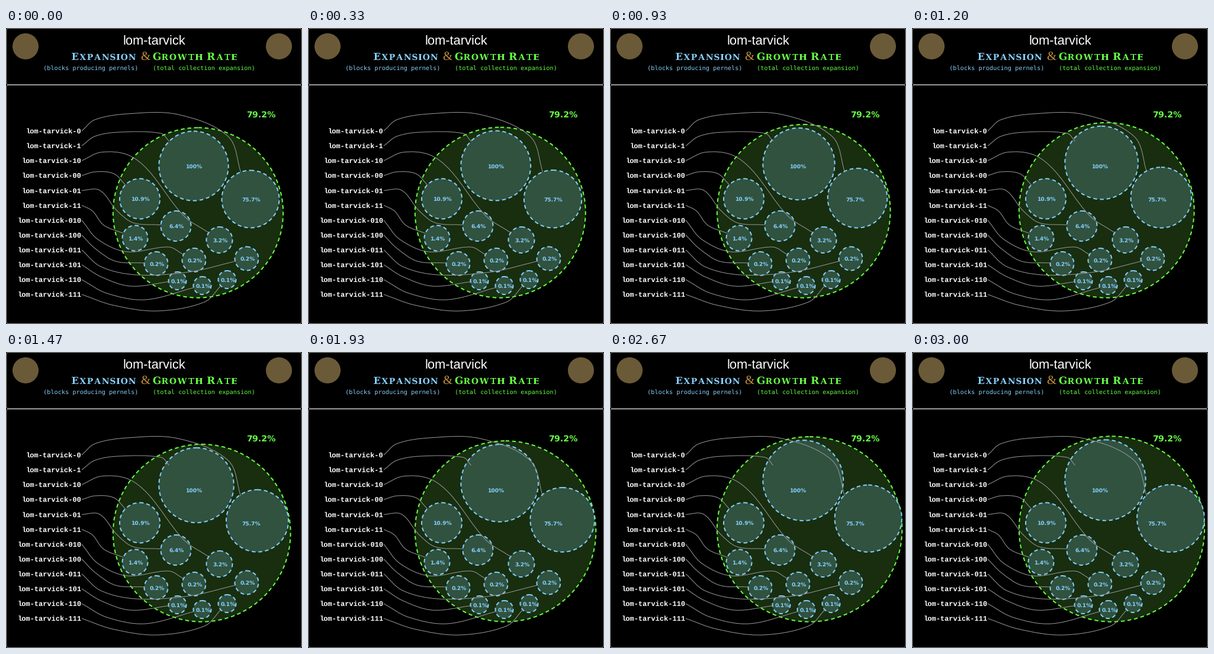
Recreate the animation shown at these times as a matplotlib script. Size 500 by 500 pixels, loop 4730 ms.

```python
import math

import matplotlib.pyplot as plt
import numpy as np
from matplotlib.animation import FuncAnimation
from matplotlib.patches import Circle, FancyBboxPatch, PathPatch
from matplotlib.path import Path
from matplotlib.textpath import TextPath
from matplotlib.transforms import Affine2D

SIZE, DPI = 500, 100
PX = 72 / DPI                      # points per pixel
FRAMES, INTERVAL = 110, 43
GROW_MS = 3000

BLUE, GREEN, GOLD, GRAY = "#87cefa", "#66ff44", "#bd8f3c", "#999999"
OUTER_FILL, INNER_FILL, COIN = "#182e0f", "#30523f", "#6b5a38"
NAME = "lom-tarvick"

plt.rcParams["text.hinting"] = "none"
fig = plt.figure(figsize=(SIZE / DPI, SIZE / DPI), dpi=DPI, facecolor="black")
ax = fig.add_axes([0, 0, 1, 1])
ax.set(xlim=(0, SIZE), ylim=(SIZE, 0))
ax.axis("off")


def label(x, y, s, px, color, font, ha="center", weight="normal"):
    ax.text(x, y, s, fontsize=px * PX, color=color, family=font, ha=ha,
            va="baseline", weight=weight, zorder=5)


def panel(top, bottom):
    ax.add_patch(FancyBboxPatch((0.5, top), SIZE - 1, bottom - top, fc="black",
                                ec=GRAY, lw=PX,
                                boxstyle="round,pad=0,rounding_size=3.5"))


def dashed(x, y, r, fill, edge, z):
    return ax.add_patch(Circle((x, y), r, fc=fill, ec=edge, lw=2 * PX,
                               ls=(0, (3.2, 2.4)), zorder=z))


def unit(v):
    return v / np.hypot(*v)


def leader(points):
    """Smooth line through the points."""
    p = np.array(points, float)
    ends = np.vstack([p[:1], p, p[-1:]])
    aim = [unit(b - a) for a, b in zip(ends, ends[2:])]
    verts = [p[0]]
    for i in range(len(p) - 1):
        reach = np.hypot(*(p[i + 1] - p[i])) / 3
        verts += [p[i] + reach * aim[i], p[i + 1] - reach * aim[i + 1], p[i + 1]]
    codes = [Path.MOVETO] + [Path.CURVE4] * (len(verts) - 1)
    ax.add_patch(PathPatch(Path(verts, codes), fc="none", ec=GRAY, lw=PX, zorder=4))


def small_caps(cx, y, text, big, small, gap, color):
    """Words with a large first letter, letter-spaced and centred on cx."""
    glyphs, x, first = [], 0, True
    for ch in text.upper():
        if ch == " ":
            x += 0.4 * small
            first = True
            continue
        path = TextPath((0, 0), ch, size=big if first else small,
                        prop={"family": "DejaVu Serif", "weight": "bold"})
        box = path.get_extents()
        glyphs.append((path, x - box.x0))
        x += box.width + gap
        first = False
    left = cx - (x - gap) / 2
    for path, dx in glyphs:
        move = Affine2D().scale(1, -1).translate(left + dx, y)
        ax.add_patch(PathPatch(move.transform_path(path), fc=color, lw=0, zorder=5))


# Header
panel(0.5, 95.5)
panel(96.5, 499.5)
for x in (33, 461):
    ax.add_patch(Circle((x, 31), 22, fc=COIN, lw=0))
label(250, 29, NAME, 21.9, "white", "Liberation Sans")
small_caps(165, 54, "Expansion", 17, 14, 2.2, BLUE)
label(235, 55, "&", 21, GOLD, "Liberation Serif")
small_caps(319.5, 54, "Growth Rate", 17, 14, 2.2, GREEN)
label(63, 71, "(blocks producing pernels)", 10.2, BLUE, "DejaVu Sans Mono", "left")
label(248, 71, "(total collection expansion)", 10.2, GREEN, "DejaVu Sans Mono", "left")
label(430.5, 150.5, "79.2%", 14.2, GREEN, "DejaVu Sans", weight="bold")

# Suffix, share, bubble (x, y, r), points the leader passes on its way
items = [
    ("0", 75.7, (413, 289, 48.5), [(150, 155), (205, 145), (290, 146), (375, 183)]),
    ("1", 100, (317, 233, 58.7), [(150, 183), (190, 176), (262, 178)]),
    ("10", 3.2, (360.5, 358, 22), [(160, 210), (205, 214), (240, 240), (300, 317)]),
    ("00", 10.9, (226, 288.5, 34), [(150, 243), (182, 246)]),
    ("01", 6.4, (287, 334.5, 25.5), [(158, 274), (187, 308), (215, 329)]),
    ("11", 1.4, (218, 355, 21.5), [(146, 309), (165, 333)]),
    ("010", 0.2, (317.5, 392, 20), [(155, 357), (204, 378), (275, 370)]),
    ("100", 0.2, (253.5, 398, 20), [(150, 372), (185, 394)]),
    ("011", 0.2, (406.5, 389.5, 20), [(160, 403), (220, 417), (310, 412)]),
    ("101", 0.1, (289.5, 427, 15), [(160, 420), (210, 436)]),
    ("110", 0.1, (331.5, 435, 15), [(170, 448), (235, 459)]),
    ("111", 0.1, (373.5, 425, 15), [(180, 468), (255, 478), (335, 463)]),
]
# How far x, y and r move while growing
growth = {"0": (24, -8, 8.4), "1": (9.5, -16.5, 9.5)}

outer = (324.5, 312, 143.7)
growing = [(dashed(*outer, OUTER_FILL, GREEN, 2), outer, (13, -13, 13))]

for i, (suffix, share, bubble, via) in enumerate(items):
    x, y, r = bubble
    row = 174 + 25.1 * i
    patch = dashed(x, y, r, INNER_FILL, BLUE, 3)
    if suffix in growth:
        growing.append((patch, bubble, growth[suffix]))
    label(x + 1.5, y + 3.5, f"{share}%", 9.2, BLUE, "DejaVu Sans", weight="bold")
    label(127.5, row + 4, f"{NAME}-{suffix}", 12, "white", "Liberation Mono",
          "right", "bold")
    # Each leader stops on the rim, heading for the bubble's centre
    centre = np.array([x, y])
    rim = centre - r * unit(centre - via[-1])
    leader([(128, row), *via, rim])


def draw(i):
    p = min(1, i * INTERVAL / GROW_MS)
    k = (1 - math.cos(math.pi * p)) / 2
    for patch, start, delta in growing:
        x, y, r = (a + d * k for a, d in zip(start, delta))
        patch.set(center=(x, y), radius=r)
    return [g[0] for g in growing]


anim = FuncAnimation(fig, draw, frames=FRAMES, interval=INTERVAL,
                     repeat=True, repeat_delay=0, blit=False)
plt.show()
```
